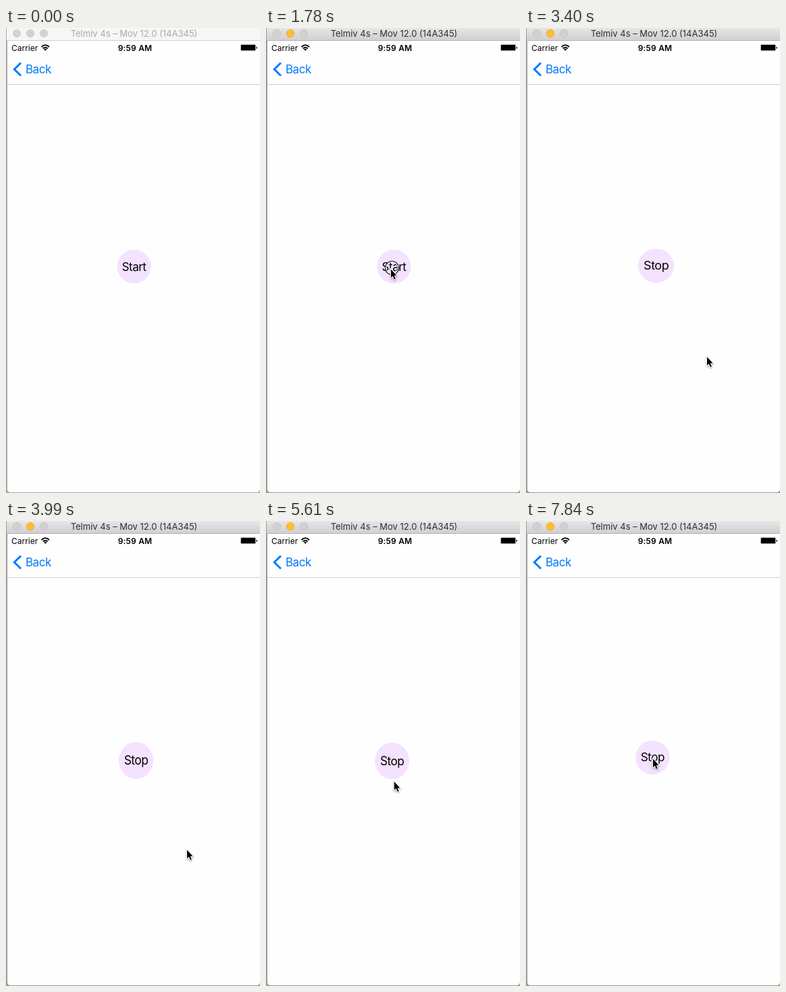
Recreate the animation shown at these times as an HTML page. Size 376 by 687 pixels, loop 7.99 s.

```html
<!DOCTYPE html>
<html lang="en">
<head>
<meta charset="utf-8">
<title>Floating button</title>
<style>
  html, body { margin: 0; width: 100%; height: 100%; overflow: hidden; background: #fff; }
  svg { display: block; width: 376px; height: 687px; }
  text { font-family: Inter, Roboto, sans-serif; }
  .mid { text-anchor: middle; }
  .body { font-size: 17px; letter-spacing: -.5px; }
  .light { fill: #d2d2d2; stroke: #cbcbcb; stroke-width: .6; }
  .back { fill: #a8a8a8; }
  #bar { fill: #f6f6f6; }
  #edge { fill: #cfcfcf; }
  #title { font-size: 13px; fill: #a9a9a9; }
  .active .back { fill: #999; }
  .active #bar { fill: url(#chrome); }
  .active #edge { fill: #b6b3b6; }
  .active #title { fill: #303030; }
  .active .light { fill: #d3d0d3; stroke: #bbb8bb; }
  .active .amber { fill: #fdbd2f; stroke: #e0a12b; }
</style>
</head>
<body>
<svg id="stage" viewBox="0 0 376 687">
  <defs>
    <linearGradient id="chrome" x2="0" y2="1">
      <stop stop-color="#e8e5e8"/>
      <stop offset="1" stop-color="#d2ced3"/>
    </linearGradient>
  </defs>

  <rect class="back" width="376" height="687"/>
  <path d="M2 19H376V682Q375 686 371 686H7Q2 686 2 681Z" fill="#fefefe"/>

  <rect id="bar" x="1" width="375" height="18"/>
  <rect id="edge" x="1" y="18" width="375" height="1"/>
  <circle class="light" cx="16" cy="8" r="5.8"/>
  <circle class="light amber" cx="36" cy="8" r="5.8"/>
  <circle class="light" cx="56" cy="8" r="5.8"/>
  <text id="title" class="mid" x="189.5" y="13">Telmiv 4s – Mov 12.0 (14A345)</text>

  <text x="8" y="33.5" font-size="12">Carrier</text>
  <g fill="none" stroke="#000" stroke-width="1.8">
    <path d="M52.5 28Q58.2 22.2 64 28"/>
    <path d="M54.7 30.4Q58.2 26.8 61.8 30.4"/>
  </g>
  <path d="M56 31.6Q58.2 29.5 60.4 31.6L58.2 33.8Z"/>
  <text class="mid" x="191" y="33.5" font-size="12" font-weight="600" letter-spacing=".2">9:59 AM</text>
  <rect x="347.4" y="24.4" width="22.2" height="9.2" rx="1.5" fill="#fff" stroke="#888" stroke-width=".7"/>
  <rect x="348" y="25" width="21" height="8" rx=".8"/>
  <path d="M370.5 27.5Q372 28 372 29.2T370.5 31Z"/>

  <path d="M22 51.5L12.3 61L22 70.5" fill="none" stroke="#007aff" stroke-width="3"/>
  <text class="body" x="29" y="67" fill="#007aff">Back</text>
  <rect x="2" y="83" width="374" height="1" fill="#cfcfcf"/>

  <g id="bubble">
    <circle r="25" fill="#f4e2ff"/>
    <text id="label" class="body mid" y="6">Start</text>
  </g>

  <g id="pointer">
    <g id="ring" fill="none" transform="translate(2.5 -.5)">
      <circle r="9" stroke="#fff" stroke-width="1.4"/>
      <circle r="10" stroke="#000" stroke-width="1.1"/>
    </g>
    <path d="M1 1.5V14L3.8 11.4L6 16.4L7.8 15.6L5.8 10.8H9.6Z" stroke="#fff" stroke-width="2" paint-order="stroke"
      style="filter: drop-shadow(0 1px 1px #0006)"/>
  </g>
</svg>

<script>
const LOOP = 7990, FIRST = 600, STEP = 147.5, LAST = 49;
const HOME = { x: 189.5, y: 352.5 };
const ENTRY = { x: 366, y: 359 };
// Pointer moves, in steps
const moves = [
  { from: 0, to: 5, x: 184, y: 355 },
  { from: 10, to: 16, x: 267, y: 484.5 },
  { from: 30, to: 36, x: 179, y: 371 },
  { from: 39, to: 41, x: 232, y: 509 },
  { from: 43, to: 47, x: 187, y: 350 }
];
// Each tap shows a ring for one step, then toggles the button
const taps = [8, 38, 48];

const [stage, bubble, label, pointer, ring] =
  ['stage', 'bubble', 'label', 'pointer', 'ring'].map(id => document.getElementById(id));

const show = (el, on) => el.setAttribute('visibility', on ? 'inherit' : 'hidden');
const clamp = p => Math.min(1, Math.max(0, p));
const easeOut = p => 1 - (1 - p) ** 2;

function tipAt(step) {
  return moves.reduce((at, { from, to, x, y }) => {
    const p = easeOut(clamp((step - from) / (to - from)));
    return { x: at.x + (x - at.x) * p, y: at.y + (y - at.y) * p };
  }, ENTRY);
}

// Eased swell from 1 to 1.1 and back, once per period
function swell(seconds, period) {
  const eased = (1 - Math.cos(Math.PI * (seconds / period % 1))) / 2;
  return 1 + 0.1 * (1 - Math.abs(2 * eased - 1));
}

function bubblePose(seconds) {
  const angle = (-135 + 72 * seconds) * Math.PI / 180;
  const x = HOME.x - 0.2 + 3.5 * Math.cos(angle);
  const y = HOME.y - 0.2 + 3.5 * Math.sin(angle);
  return `translate(${x} ${y}) scale(${swell(seconds, 1)} ${swell(seconds, 1.5)})`;
}

function draw(now) {
  const time = now % LOOP;
  const step = Math.min(LAST, Math.floor((time - FIRST + 12) / STEP));
  const past = taps.filter(tap => tap < step);
  const floating = past.length % 2 === 1;

  stage.classList.toggle('active', step >= taps[0]);
  label.textContent = floating ? 'Stop' : 'Start';
  bubble.setAttribute('transform', floating
    ? bubblePose((step - past.at(-1)) * STEP / 1000)
    : `translate(${HOME.x} ${HOME.y})`);

  const tip = tipAt(step);
  pointer.setAttribute('transform', `translate(${tip.x} ${tip.y})`);
  show(pointer, step >= 0);
  show(ring, taps.includes(step));
}

const began = performance.now();
function tick() {
  draw(performance.now() - began);
  requestAnimationFrame(tick);
}
tick();
</script>
</body>
</html>
```
